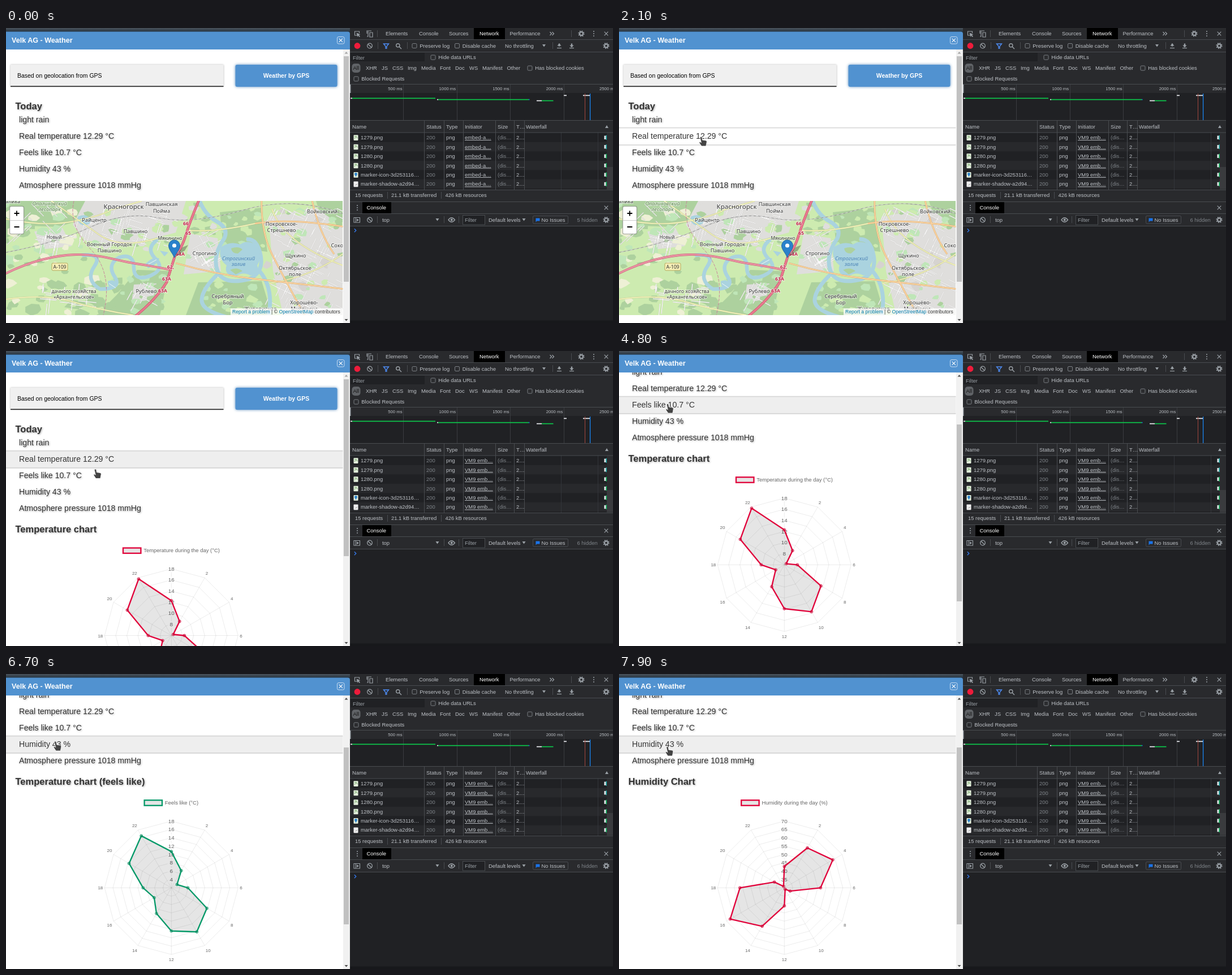
These frames come from a looping animation (1073 by 522 pixels, 8000 ms). An HTML page:

```html
<!DOCTYPE html>
<html lang="en">
<head>
<meta charset="utf-8">
<title>Weather</title>
<style>
html, body { margin: 0; width: 100%; height: 100%; overflow: hidden; background: #202124; }
svg { display: block; width: 1073px; height: 522px; font-family: "Liberation Sans", Arial, sans-serif; }
.tools { font-size: 9.43px; fill: #bdc1c6; }
.dim { fill: #7f8489; }
.ruler { font-size: 7.7px; text-anchor: end; }
.row { font-size: 14.14px; fill: #333; }
.head { font-size: 16.5px; font-weight: bold; fill: #333; }
.soft { filter: drop-shadow(1px 1.5px 1.5px rgba(0,0,0,.35)); }
.raised { filter: drop-shadow(0 0 1.5px rgba(0,0,0,.3)); }
.glow { filter: drop-shadow(0 0 2.6px rgba(40,105,170,.75)); }
.hover { filter: drop-shadow(0 0 1.2px rgba(0,0,0,.55)); }
.map { font: 9.2px "Noto Sans", "DejaVu Sans", sans-serif; text-anchor: middle; fill: #333; paint-order: stroke; stroke: rgba(255,255,255,.6); stroke-width: 1.8px; }
.map.nature { fill: #5d8250; font-style: italic; }
.map.lake { fill: #4f86b8; font-style: italic; stroke: none; }
.map.exit { fill: #c2234b; font-size: 8.6px; font-weight: bold; }
.credit { font-size: 8.64px; fill: #333; }
.link { fill: #0078a8; }
</style>
</head>
<body>
<svg id="stage" viewBox="0 0 1073 522"></svg>
<script>
const text = (x, y, s, a = '') => `<text x="${x}" y="${y}" ${a}>${s}</text>`;
const rect = (x, y, w, h, fill, a = '') => `<rect x="${x}" y="${y}" width="${w}" height="${h}" fill="${fill}" ${a}/>`;
const line = (d, color, w = 1, a = '') => `<path d="${d}" fill="none" stroke="${color}" stroke-width="${w}" ${a}/>`;
const fill = (d, color, a = '') => `<path d="${d}" fill="${color}" ${a}/>`;
const dot = (x, y, r, color, a = '') => `<circle cx="${x}" cy="${y}" r="${r}" fill="${color}" ${a}/>`;

let seed = 7;
const rnd = () => (seed = seed * 16807 % 2147483647) / 2147483647;

/* ---------- map ---------- */
const FOREST = '#add19e', MEADOW = '#cdebb0', PARK = '#bfe6b8', CITY = '#dfdedc', FIELD = '#eef0d5', WATER = '#aad3df';

function streets(x, y, w, h, n, tilt) {
  let d = '';
  for (let i = 0; i < n; i++) {
    const a = tilt + (i % 2) * Math.PI / 2, l = 8 + rnd() * 24;
    d += `M${(x + rnd() * w).toFixed(1)} ${(y + rnd() * h).toFixed(1)}l${(l * Math.cos(a)).toFixed(1)} ${(l * Math.sin(a)).toFixed(1)}`;
  }
  return line(d, '#c4c2c0', 1.6) + line(d, '#fff', 1);
}

// irregular plots of land scattered over a box
function plots(x, y, w, h, n, size, ...colors) {
  let s = '';
  for (let i = 0; i < n; i++) {
    const px = x + rnd() * w, py = y + rnd() * h, r = size * (.4 + rnd() * .8);
    const pts = Array.from({ length: 7 }, (_, j) => {
      const q = r * (.6 + rnd() * .6), a = j * Math.PI / 3.5;
      return `${(px + q * Math.cos(a)).toFixed(1)} ${(py + q * .7 * Math.sin(a)).toFixed(1)}`;
    });
    s += fill(`M${pts.join('L')}z`, colors[i % colors.length]);
  }
  return s;
}

const road = (d, edge, core, w) => line(d, edge, w) + line(d, core, w - 1);

const places = [
  [9, 310, 'палиха'], [208, 320, 'Красногорск', 11.5], [275, 315, 'Павшинская'], [275, 327, 'Пойма'],
  [156, 343, 'Райцентр'], [229, 363, 'Павшино'], [290, 375, 'Мякинино', 8.4],
  [85, 373, 'Новый', 8], [183, 386, 'Военный Городок'], [183, 397, 'Павшино'],
  [351, 402, 'Строгино'], [559, 328, 'Войковский'], [487, 350, 'Покровское-'], [487, 361, 'Стрешнево'],
  [588, 388, 'Сокол'], [512, 406, 'Щукино'], [511, 428, 'Октябрьское'], [511, 439, 'поле'],
  [120, 469, 'дачного хозяйства', 8.6], [120, 479, '«Архангельское»', 8.6],
  [248, 469, 'Рублево'], [392, 478, 'Серебряный'], [392, 489, 'Бор'], [527, 489, 'Хорошёво-'], [527, 500, 'Мнёвники'],
  [450, 500, 'Живописная']
];
const exits = [[318, 349, '66'], [322, 366, '65'], [308, 403, '64А'], [291, 426, '62,'], [284, 447, '63А'], [277, 468, '63А']];

function land() {
  return rect(0, 306, 595, 202, MEADOW) +
    fill('M0 306H150L138 338 92 352 40 350 0 372zM232 428L288 430 272 508H160L196 472zM378 326L452 318 462 396 384 386zM340 450L452 448 470 508H318zM548 306H595V344L562 350z', FOREST) +
    fill('M140 306H318L300 362 262 372 205 384 140 376 118 348zM50 360L100 354 116 386 62 392zM326 364L374 372 380 430 314 436zM464 334L548 318 595 352V508H490L472 430zM226 454L266 452 260 480 222 486z', CITY) +
    plots(0, 312, 130, 70, 26, 12, FOREST, PARK, FIELD) + plots(0, 440, 190, 66, 38, 13, FOREST, MEADOW, FIELD, FOREST) +
    plots(0, 384, 140, 50, 18, 11, FOREST, FIELD, PARK) + plots(190, 430, 90, 74, 22, 10, PARK, FOREST) +
    plots(350, 452, 100, 52, 16, 9, MEADOW, PARK) + plots(382, 320, 72, 66, 16, 9, PARK, MEADOW) +
    plots(130, 310, 170, 90, 32, 9, PARK, MEADOW, CITY, FOREST) + plots(300, 310, 80, 60, 16, 9, FOREST, CITY, MEADOW) +
    plots(460, 310, 135, 196, 44, 10, PARK, MEADOW, FOREST, '#d6d3d0') + plots(320, 372, 50, 56, 8, 7, PARK);
}

function rivers() {
  return line('M340 300Q350 330 372 342T386 372Q364 404 374 430T430 444Q456 432 450 402T425 374', WATER, 7) +
    fill('M380 388Q396 376 414 383 430 372 446 388 453 406 444 420 450 434 432 438 420 430 404 440 384 436 390 420 374 408 380 388z', WATER) +
    fill('M398 390q13-5 20 2l-8 7q-11 0-12-9zM396 428q12-6 22 2l-12 6z', FOREST) +
    line('M376 434Q348 460 346 480T392 512M448 430Q474 460 464 512', WATER, 7) +
    line('M268 374Q246 390 264 408T256 438Q226 450 226 424T200 406Q178 418 192 440T166 462Q140 446 156 422T134 402', WATER, 6.5) +
    fill('M128 333q14-5 20 4t-8 12q-12 1-14-12zM246 418q14-15 25-10-4 11-20 17zM180 448q8-4 15 2l-4 11q-12-1-11-13zM272 394l15 3-7 7z', WATER) +
    line('M248 420l18-10M182 452l12 8', '#fff', .8);
}

function roads() {
  const rail = 'M-4 398Q90 380 150 352T270 336 420 322 600 330';
  const yellow = 'M0 338Q70 352 120 342T185 322L240 306M80 306Q128 340 165 366T268 372M0 480Q70 470 120 485T225 508M318 358Q370 362 440 346M470 320Q490 380 595 420M466 452Q540 440 595 400';
  const amber = 'M440 346Q500 336 600 352M452 300Q450 360 470 400T530 512M300 416Q370 436 440 444T600 462M540 300Q552 360 580 400';
  return line(rail, '#999', 1.2) + line(rail, '#eee', .7, 'stroke-dasharray="4 4"') +
    road(yellow, '#c5c18e', '#f7fabf', 2.4) + road(amber, '#d9a565', '#fcd6a4', 2.8) +
    line('M120 306Q110 350 150 392T172 508', '#c8829a', 1, 'stroke-dasharray="5 2"') +
    road('M-4 436C40 414 84 402 124 401C168 400 196 412 230 417S270 424 292 428', '#c8546e', '#e892a2', 3.8) +
    road('M343 300Q326 340 318 366T299 402L284 450Q262 484 226 512', '#c53f5b', '#e8798f', 4.4);
}

function map() {
  return `<g clip-path="url(#mapBox)">` + land() +
    streets(125, 308, 165, 76, 70, .3) + streets(322, 366, 46, 60, 30, -.5) + streets(466, 316, 120, 180, 110, .45) +
    streets(50, 358, 55, 28, 18, .2) + streets(60, 450, 90, 44, 24, .1) + streets(222, 450, 36, 32, 14, .5) + streets(0, 310, 120, 60, 14, .8) +
    rivers() + roads() +
    text(77, 314, 'Опалиховский', 'class="map nature"') + text(77, 324, 'лесопарк', 'class="map nature"') +
    text(411, 411, 'Строгинский', 'class="map lake"') + text(411, 421, 'залив', 'class="map lake"') +
    places.map(([x, y, s, size = 9.2]) => text(x, y, s, `class="map" style="font-size:${size}px"`)).join('') +
    exits.map(([x, y, s]) => text(x, y, s, 'class="map exit"')).join('') +
    rect(81, 416, 28, 13, '#f6efb6', 'rx="2" stroke="#b5a95d"') + text(95, 426, 'А-109', 'class="map" style="stroke:none;font-size:8.6px"') +
    fill('M298 406L312 388 322 384 316 394z', 'rgba(0,0,0,.28)') +
    fill('M297.5 406.5C294 397 287.5 393 287.5 385a10 10 0 0 1 20 0C307.5 393 301 397 297.5 406.5z', '#2a81cb', 'stroke="#1f6097" stroke-width=".8"') + dot(297.5, 385, 3.6, '#fff') +
    rect(6.5, 315.5, 25, 49, '#fff', 'rx="3" stroke="rgba(0,0,0,.25)" stroke-width="1.6"') + rect(7, 340, 24, 1, '#ccc') +
    line('M14.5 328H23.5M19 323.5V332.5M14.5 352H23.5', '#000', 1.8) +
    rect(397, 496, 198, 12, 'rgba(255,255,255,.75)') +
    `<text x="400" y="504.8" class="credit"><tspan class="link">Report a problem</tspan> | © <tspan class="link">OpenStreetMap</tspan> contributors</text></g>`;
}

/* ---------- radar charts ---------- */
const RED = '#e1053c', GREEN = '#079a69';
const charts = [
  { title: 'Temperature chart', label: 'Temperature during the day (°C)', x: 207, color: RED, min: 6, step: 2, n: 6,
    data: [12.29, 8.95, 6.4, 8.34, 13.6, 15.75, 13.9, 10.55, 7.8, 10.17, 15.15, 17.76] },
  { title: 'Temperature chart (feels like)', label: 'Feels like (°C)', x: 244.6, color: GREEN, min: 2, step: 2, n: 8,
    data: [10.7, 6.75, 3.57, 5.95, 11.83, 14.2, 12.37, 9.13, 6.75, 8.78, 13.7, 16.4] },
  { title: 'Humidity Chart', label: 'Humidity during the day (%)', x: 216.2, color: RED, min: 30, step: 5, n: 8,
    data: [43, 58, 64, 52, 34, 31, 41, 57, 68, 57, 37, 31] }
];
const CX = 292.3, CY = 503.5, R = 118;
const polar = (i, r) => [CX + r * Math.sin(i * Math.PI / 6), CY - r * Math.cos(i * Math.PI / 6)].map(v => v.toFixed(2));
const ringPath = f => 'M' + Array.from({ length: 12 }, (_, i) => polar(i, f(i))).join('L') + 'z';

function radar(c, k) {
  let s = text(16.5, 321.2, c.title, 'class="head soft"') +
    rect(c.x, 348.5, 31.4, 9.4, '#e5e5e5', `stroke="${c.color}" stroke-width="2.36"`) +
    text(c.x + 36.2, 356.4, c.label, 'font-size="9.43" fill="#666"');
  let grid = '', ticks = '';
  for (let j = 1; j <= c.n; j++) {
    const r = R * j / c.n;
    grid += ringPath(() => r);
    ticks += rect(CX - 6.8, CY - r - 6, 13.6, 12, 'rgba(255,255,255,.75)') +
      text(CX, CY - r + 3.3, c.min + c.step * j, 'font-size="9.8" fill="#666" text-anchor="middle"');
  }
  for (let i = 0; i < 12; i++) {
    grid += `M${CX} ${CY}L${polar(i, R)}`;
    if (!i) continue;
    const [x, y] = polar(i, 121), up = i < 3 || i > 9, side = i % 6 ? (i < 6 ? 'start' : 'end') : 'middle';
    ticks += text(x, +y + 3 + (i % 6 == 3 ? 0 : up ? -5.5 : 5.5), i * 2, `font-size="8" fill="#666" text-anchor="${side}"`);
  }
  const radius = i => k * R * (c.data[i] - c.min) / (c.step * c.n);
  s += line(grid, 'rgba(0,0,0,.1)', .8) + ticks +
    fill(ringPath(radius), 'rgba(0,0,0,.1)', `stroke="${c.color}" stroke-width="2.36" stroke-linejoin="round"`);
  c.data.forEach((_, i) => { s += dot(...polar(i, radius(i)), 2.4, 'rgba(0,0,0,.1)', `stroke="${c.color}" stroke-width=".9"`); });
  return s;
}

/* ---------- developer tools ---------- */
const BAR = '#292a2d', EDGE = '#494c50', ICON = '#9aa0a6';
const rule = y => rect(608, y, 465, 1, EDGE);
const sep = (x, y) => rect(x, y - 6, 1, 12, EDGE);
const gear = (x, y) => dot(x, y, 4.6, 'none', `stroke="${ICON}" stroke-width="2" stroke-dasharray="1.8 1.81"`) + dot(x, y, 2.9, 'none', `stroke="${ICON}" stroke-width="2"`);
const cross = (x, y) => line(`M${x - 3.3} ${y - 3.3}l6.6 6.6m0-6.6l-6.6 6.6`, ICON, 1.2);
const dots = (x, y) => [-4, 0, 4].map(d => dot(x, y + d, 1, ICON)).join('');
const clear = (x, y) => dot(x, y, 4.3, 'none', `stroke="${ICON}" stroke-width="1.3"`) + line(`M${x - 3} ${y - 3}l6 6`, ICON, 1.3);
const check = (x, y, s) => rect(x - 4, y - 4, 8, 8, '#2b2c2f', `rx="1.5" stroke="#85898e" stroke-width=".9"`) + text(x + 9.3, y + 3.4, s);
const down = (x, y) => fill(`M${x - 3} ${y - 2}h6l-3 4.6z`, ICON);
const words = (y, ...list) => list.map(([x, s, a]) => text(x, y, s, a)).join('');
const arrow = (x, y, dir) => line(`M${x - 4} ${y + 4.5}h8`, ICON, 1.2) + fill(`M${x - 3.6} ${y - .5 * dir}h7.2l-3.6 ${4 * dir}z`, ICON) + rect(x - 1.2, y - 3.5, 2.4, 5, ICON);

function requests() {
  const names = ['1279.png', '1279.png', '1280.png', '1280.png', 'marker-icon-3d253116…', 'marker-shadow-a2d94…'];
  let s = rect(608, 185, 465, 101, '#202124');
  names.forEach((n, i) => {
    const top = 185.5 + i * 16.45, y = top + 8.3;
    if (i % 2) s += rect(608, top, 454, 16.45, '#28292c');
    s += rect(614.5, y - 4.5, 8, 9.6, i == 5 ? '#eee' : '#e2eedb', 'rx=".8"');
    s += i < 4 ? line(`M616 ${y + 2}l2.5-3 3 1.5M616 ${y - 2}h4`, '#78a86c', 1)
      : i == 4 ? fill(`M618.5 ${y + 4}l-2.5-5a2.5 2.5 0 1 1 5 0z`, '#2a81cb') : fill(`M616 ${y + 3}l4-3 1 1z`, '#999');
    s += words(y + 3.4, [627, n], [743, '200', 'class="dim"'], [778, 'png'],
      [811, 'embed-a…', 'class="initiator" text-decoration="underline"'], [869, '(dis…', 'class="dim"'], [902, '2…']);
    s += rect(1057.5, y - 3.2, 3, 6.4, '#e8eaed') + rect(1060.5, y - 4, 1.5, 8, i < 2 ? '#1db5b0' : '#0fbf62');
  });
  s += rect(981, 185, 1, 101, '#33353a') + rect(1046, 185, 1, 101, '#33353a');
  s += [739, 774, 808, 865, 898, 916].map(x => rect(x, 164, 1, 122, EDGE)).join('');
  return s + rect(1062, 185, 11, 101, '#2b2c2f') + rect(1062, 246, 11, 39, '#3a3b3e');
}

function tools() {
  let s = rect(608, 0, 465, 522, '#202124') + rect(608, 0, 465, 115, BAR) + rule(20) + rule(42);
  s += line('M621 13h-4.5V6h8v3', ICON, 1.2) + fill('M619.5 8.5l7 2.8-2.8 1 2.3 2.4-1.2 1.2-2.4-2.4-1.1 2.5z', ICON);
  s += line('M638 10V5h8M638 15h2V6M643 8h5v8h-5z', ICON, 1.2) + sep(656, 10) + rect(827, 0, 55, 20, '#000');
  s += words(13.4, [671, 'Elements'], [730, 'Console'], [783, 'Sources'], [837, 'Network', 'fill="#fff"'], [890.5, 'Performance']);
  s += line('M961.5 7l3 3-3 3m4-6l3 3-3 3', ICON, 1.3) + sep(999, 10) + gear(1017, 10) + dots(1039, 10) + cross(1061, 10);
  s += dot(621, 31.5, 5.4, '#ee1c3b') + clear(643, 31.5) + sep(657, 31) + line('M667.5 28h9l-3.6 4.5V36h-1.8v-3.5z', '#4e8df5', 1.4);
  s += dot(692.8, 30.8, 3.1, 'none', `stroke="${ICON}" stroke-width="1.4"`) + line('M695 33l4 4', ICON, 1.5) + sep(709, 31);
  s += check(722, 31.5, 'Preserve log') + check(797.5, 31.5, 'Disable cache') + text(882, 34.9, 'No throttling') + down(951, 31) + sep(966, 31);
  s += arrow(978, 31, -1) + arrow(1000, 31, 1) + gear(1061, 31.5);
  s += rect(609, 44, 131, 15, '#202124') + text(613, 55.5, 'Filter', `fill="${ICON}"`) + check(755, 52, 'Hide data URLs');
  s += rect(611.5, 63, 15, 16, '#606367', 'rx="5"') + words(74.3, [613.5, 'All', 'fill="#111"'], [636, 'XHR'], [664, 'JS'], [683, 'CSS'], [710, 'Img'],
    [734, 'Media'], [767, 'Font'], [794, 'Doc'], [819, 'WS'], [842, 'Manifest'], [885.5, 'Other']);
  s += check(926, 71, 'Has blocked cookies') + check(619, 90, 'Blocked Requests') + rule(99) + rule(163);
  s += words(110, ...[500, 1000, 1500, 2000].map((v, i) => [700.5 + i * 94.6, v + ' ms', 'class="ruler"'])) + text(1049, 110, '2500 ms', 'style="font-size:7.7px"');
  s += [702, 797, 891, 986].map(x => rect(x, 100, 1, 63, '#3a3c40')).join('') + rect(608, 100, 1.5, 15, '#9aa0a6');
  const g = '#0cc84b', w = '#e8eaed';
  s += [[609, 124, 3, w], [612, 124, 147, g], [762, 126.3, 2, w], [764, 126.3, 160, g], [924, 126.3, 1.5, '#1a73e8'], [938, 128.3, 9, w], [947, 128.3, 20.5, g], [986, 119, 5, w], [1020, 119, 12, w]]
    .map(b => rect(b[0], b[1] - .5, b[2], 1.7, b[3])).join('');
  s += rect(1023, 116, 1, 47, '#a2473f') + rect(1032, 116, 1.2, 47, '#1a8cff');
  s += rect(608, 164, 465, 21, BAR) + words(178, [612, 'Name'], [743, 'Status'], [778, 'Type'], [811, 'Initiator'], [869, 'Size'], [902, 'T…'], [919, 'Waterfall']);
  s += fill('M1059 177h6l-3-5z', ICON) + requests() + rule(184.5) + rect(608, 286, 465, 64, BAR) + rule(286);
  s += words(299.4, [617, '15 requests'], [681, '21.1 kB transferred'], [776.5, '426 kB resources']) + sep(674, 296) + sep(769, 296);
  s += rule(307) + dots(621, 318) + rect(630, 308, 51, 20, '#000') + text(637.5, 321.4, 'Console', 'fill="#fff"') + cross(1061, 318) + rule(328);
  s += line('M615 335.5h10.5v8.5h-10.5zM618.3 335v9', ICON, 1.1) + fill('M620 337.3l4 2.5-4 2.5z', ICON) + clear(643, 339.5) + sep(656, 339);
  s += text(665, 342.6, 'top') + down(762.5, 339) + sep(774, 339) + line('M782 339.5q5.5-7.5 11.5 0-6 7.5-11.5 0z', ICON, 1.3) + dot(787.7, 339.5, 2, ICON) + sep(800, 339);
  s += rect(807.5, 331.5, 39, 16.5, '#202124', `stroke="${EDGE}"`) + words(342.8, [811, 'Filter', `fill="${ICON}"`], [853, 'Default levels'], [946.5, 'No Issues'], [1009.5, '5 hidden', 'id="hidden" class="dim"']);
  s += down(915.5, 339) + rect(931.5, 332.5, 62, 13.5, 'none', `rx="1.5" stroke="${EDGE}"`) + fill('M936.5 336.5h7v5h-5l-2 2z', '#1a73e8') + gear(1061, 339.5);
  return s + rule(350) + line('M615.8 355.2l3 3-3 3', '#367cf1', 1.3) + rect(608, 517.5, 465, 5, '#17181b');
}

/* ---------- weather window ---------- */
const rows = ['light rain', 'Real temperature 12.29 °C', 'Feels like 10.7 °C', 'Humidity 43 %', 'Atmosphere pressure 1018 mmHg'];
const ROW = 29.1;

function page() {
  const blue = '#5192d0';
  return rect(0, 0, 608, 38, 'url(#dusk)') + rect(0, 38, 608, 484, '#fff') +
    `<g clip-path="url(#pageBox)"><g id="scroll">` +
    rect(8, 65, 376.5, 38, '#f0f0f0', 'class="raised" rx="1"') + rect(8, 102.5, 376.5, 1.6, '#222') +
    text(20, 87.5, 'Based on geolocation from GPS', 'font-size="10.47" fill="#000"') +
    rect(405.5, 65, 180, 39, blue, 'class="glow" rx="3"') +
    text(495.5, 88.2, 'Weather by GPS', 'font-size="10.47" font-weight="bold" fill="#fff" text-anchor="middle"') +
    text(16.5, 144, 'Today', 'class="head soft"') + rect(-4, 0, 603, 29.3, '#eee', 'id="bar" class="hover"') +
    rows.map((r, i) => text(23, 166.8 + i * ROW, r, 'class="row soft"')).join('') +
    `<g id="map">${map()}</g><g id="chart"></g></g></g>` +
    rect(596, 38, 12, 484, '#f1f1f1') + rect(597, 50, 9, 313, '#c1c1c1', 'id="thumb"') +
    fill('M598.5 45.5h6l-3-3.5z', '#a3a3a3', 'id="upArrow"') + fill('M598.5 515h6l-3 3.5z', '#505050') +
    fill('M0 38V6.4H604a4 4 0 0 1 4 4V38z', blue) + text(10, 25.6, 'Velk AG - Weather', 'font-size="12.57" font-weight="bold" fill="#fff"') +
    rect(585.5, 15.5, 12.5, 12.5, 'none', 'rx="2.5" stroke="#d5e5f5" stroke-width=".9"') + line('M588.6 18.6l6.3 6.3m0-6.3l-6.3 6.3', '#fff', 1.1);
}

const $ = id => document.getElementById(id);
$('stage').innerHTML = `<defs><clipPath id="pageBox"><rect y="38" width="595.5" height="484"/></clipPath>
<clipPath id="mapBox"><rect y="306" width="595.5" height="202"/></clipPath>
<linearGradient id="dusk" x2="0" y2="1"><stop stop-color="#4a535b"/><stop offset=".16" stop-color="#293744"/></linearGradient></defs>` +
  page() + `<g class="tools">${tools()}</g><g id="cursor">` +
  fill('M-3.6-8.3c1.2-.5 2.2.2 2.4 1.4l.6 4 5.6.8c1.7.3 2.5 1.3 2.2 3L6.5 4.6 5.8 8h-8L-5.8 2.6c-1-1.4.4-2.8 1.8-1.8l1.3 1-2-8.4c-.2-.8.2-1.4 1.1-1.7z', '#444', 'id="hand" stroke="#fff" stroke-width=".8"') +
  fill('M-4-8V5l3-2.6 2 4.6 2.2-1-2-4.4H5z', '#333', 'id="pointer" stroke="#fff" stroke-width=".8"') + '</g>';

/* ---------- timeline ---------- */
const rowEls = [...document.querySelectorAll('.row')], initiators = [...document.querySelectorAll('.initiator')];
const last = (list, t) => list.reduce((v, e) => t >= e[0] ? e : v, list[0]);
const within = (t, a, b) => t >= a && t < b;
const quart = p => 1 - (1 - Math.min(1, Math.max(0, p))) ** 4;

const hoverAt = [[0, -1], [800, 0], [900, 1], [4800, 2], [6700, 3]];
const growth = [[5300, 0], [5600, .67], [5900, .967], [6100, .994], [6300, 1], [7300, 0], [7600, .83], [7900, .986]];
const rests = [[4800, 89, 102], [6500, 90, 106], [6700, 90.5, 128], [6800, 88.5, 137]];

function cursorAt(t) {
  if (t >= 4800) return last(rests, t).slice(1);
  if (t >= 2400) { const p = Math.min(1, (t - 2400) / 400); return [148 + 13 * p, 201 + 16.5 * p]; }
  const p = Math.min(1, (t - 600) / 500);
  return [200 - 52 * p, 100 + 101 * p];
}

let shown = -1;
function draw(t) {
  if (t === shown) return;
  shown = t;
  const hover = last(hoverAt, t)[1], pressed = within(t, 1900, 2200) || within(t, 5200, 5300) || within(t, 7100, 7300);
  const scroll = t >= 4800 ? 125.2 : 0, charted = t >= 2200;
  $('scroll').setAttribute('transform', `translate(0 ${-scroll})`);
  $('bar').setAttribute('y', 177.2 + (hover - 1) * ROW);
  $('bar').setAttribute('fill', pressed ? '#fff' : '#eee');
  $('bar').style.display = hover < 0 ? 'none' : '';
  rowEls.forEach((el, i) => el.classList.toggle('soft', i !== hover));
  $('map').style.display = charted ? 'none' : '';
  const kind = t >= 7300 ? 2 : t >= 5300 ? 1 : 0;
  const k = kind ? last(growth, t)[1] : t >= 2800 ? 1 : quart((t - 2150) / 850);
  $('chart').innerHTML = charted ? radar(charts[kind], k) : '';
  $('thumb').setAttribute('y', scroll ? 130 : 50);
  $('thumb').setAttribute('height', charted ? 313 : 399);
  $('upArrow').setAttribute('fill', scroll ? '#505050' : '#a3a3a3');
  initiators.forEach(el => el.textContent = t >= 1900 ? 'VM9 emb…' : 'embed-a…');
  $('hidden').textContent = (t >= 2100 ? 6 : 5) + ' hidden';
  const [x, y] = cursorAt(t);
  $('cursor').setAttribute('transform', `translate(${x} ${y})`);
  $('cursor').style.display = t < 600 ? 'none' : '';
  $('hand').style.display = hover < 0 ? 'none' : '';
  $('pointer').style.display = hover < 0 ? '' : 'none';
}

const start = performance.now();
function tick() {
  draw(Math.floor((performance.now() - start) % 8000 / 100) * 100);
  requestAnimationFrame(tick);
}
tick();
</script>
</body>
</html>
```
